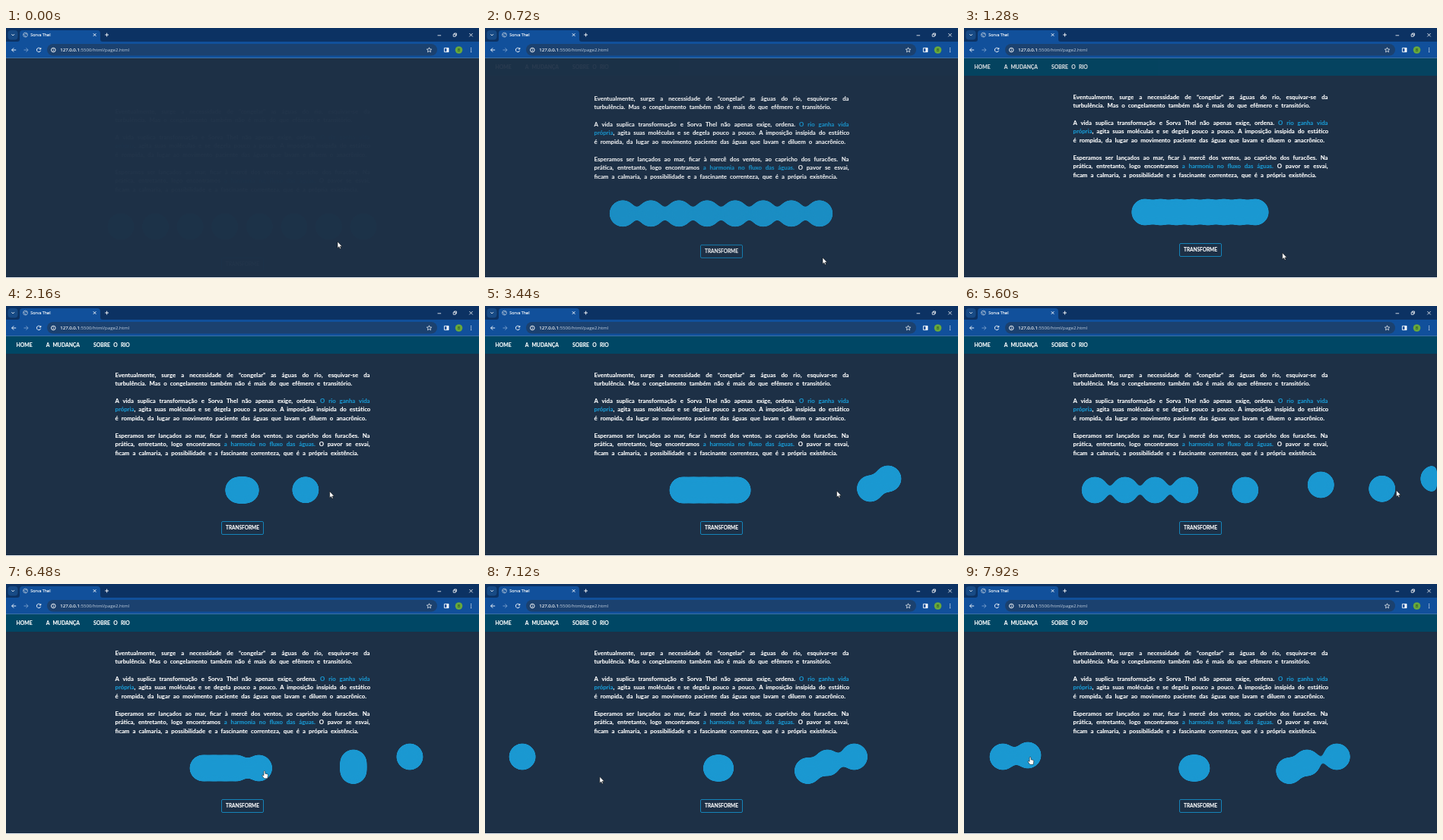
Write an HTML page that moves like this. It is 622 by 330 pixels and loops after 8 s.

```html
<!DOCTYPE html>
<html lang="pt">
<head>
<meta charset="utf-8">
<title>Sorva Thel</title>
<style>
  html, body { margin: 0; width: 100%; height: 100%; overflow: hidden; background: #1d3046; }
  #stage { position: absolute; left: 0; top: 0; width: 622px; height: 330px; overflow: hidden;
    background: #1d3046; color: #fff; font: bold 7.78px/11.46px Lato, sans-serif;
    -webkit-text-stroke: 0.12px currentColor; }
  svg { position: absolute; left: 0; top: 0; }
  #content { position: absolute; left: 0; top: 0; width: 622px; height: 330px; }
  #prose { position: absolute; left: 143.5px; top: 85.5px; width: 335px; word-spacing: 2.2px; }
  #prose p { margin: 0 0 11.46px; }
  #prose span { display: block; white-space: nowrap; text-align-last: justify; }
  #prose span:last-child { text-align-last: left; }
  em { font-style: normal; color: #1a98d1; }
  #button { position: absolute; left: 283px; top: 284px; width: 54px; height: 16px;
    border: 1px solid #1583b8; border-radius: 2px; text-align: center; font-size: 6.48px; line-height: 16.4px; }
  #nav { position: absolute; left: 0; top: 40px; width: 622px; height: 23px; background: #004765;
    font-size: 6.8px; line-height: 23.8px; word-spacing: 2.6px; white-space: nowrap; }
  #nav b { position: absolute; top: 0; }
  .ui { font-family: "Open Sans", "Noto Sans", sans-serif; font-weight: 400; -webkit-text-stroke: 0; }
</style>
</head>
<body>
<div id="stage">
  <div id="content">
    <div id="prose">
      <p><span>Eventualmente, surge a necessidade de “congelar” as águas do rio, esquivar-se da</span>
        <span>turbulência. Mas o congelamento também não é mais do que efêmero e transitório.</span></p>
      <p><span>A vida suplica transformação e Sorva Thel não apenas exige, ordena. <em>O rio ganha vida</em></span>
        <span><em>própria</em>, agita suas moléculas e se degela pouco a pouco. A imposição insípida do estático</span>
        <span>é rompida, da lugar ao movimento paciente das águas que lavam e diluem o anacrônico.</span></p>
      <p><span>Esperamos ser lançados ao mar, ficar à mercê dos ventos, ao capricho dos furacões. Na</span>
        <span>prática, entretanto, logo encontramos <em>a harmonia no fluxo das águas.</em> O pavor se esvai,</span>
        <span>ficam a calmaria, a possibilidade e a fascinante correnteza, que é a própria existência.</span></p>
    </div>
    <svg width="622" height="330">
      <filter id="goo" filterUnits="userSpaceOnUse" x="0" y="0" width="622" height="330" color-interpolation-filters="sRGB">
        <feGaussianBlur stdDeviation="4.7"/>
        <feColorMatrix values="1 0 0 0 0  0 1 0 0 0  0 0 1 0 0  0 0 0 20 -9.5"/>
      </filter>
      <clipPath id="view"><rect width="622" height="330"/></clipPath>
      <g filter="url(#goo)"><g id="drops" fill="#1a98d1" clip-path="url(#view)"></g></g>
    </svg>
    <div id="button">TRANSFORME</div>
  </div>

  <div id="nav">
    <b style="left:13.5px">HOME</b><b style="left:52.7px">A MUDANÇA</b><b style="left:115px">SOBRE O RIO</b>
  </div>

  <svg width="622" height="330" fill="none" stroke="#fff" stroke-width="0.9">
    <g stroke="none">
      <path fill="#0c3263" d="M0 0H622V19H0z"/>
      <path fill="#11509b" d="M0 18H622V40H0z"/>
      <path fill="#11509b" d="M15 18q3 0 3-3V7q0-4 4-4H120q4 0 4 4V15q0 3 3 3z"/>
      <path fill="#4a7ba8" d="M0 39.2H622V40H0z"/>
      <rect fill="#174a85" x="2.5" y="3" width="13" height="12.5" rx="4"/>
      <rect fill="#1b416f" x="54" y="21" width="513" height="15.6" rx="7.8"/>
      <path fill="#e9eef2" d="M0 329H622V330H0z"/>
      <circle fill="#68a83c" cx="595.5" cy="29" r="4.8"/>
    </g>
    <path d="M7.4 8.2l1.8 1.8 1.8-1.8"/>
    <g stroke="#c3d0de" stroke-width="0.7">
      <circle cx="25.5" cy="9" r="2.9"/>
      <path d="M22.8 8.3q2 .2 2.4 2t1.4 1.5M24.5 6.3q.4 1.8 3.6 1.8"/>
    </g>
    <path d="M114.8 7.2l3.6 3.6m0-3.6l-3.6 3.6M130.2 9h4.8m-2.4-2.4v4.8"/>
    <path stroke-width="0.8" d="M567.5 9.8h4.6M588.2 8.2h3v3h-3zM589.4 8.2V7h3v3h-1.2M609.3 7l4.4 4.4m0-4.4l-4.4 4.4"/>
    <path d="M13.2 29H7.6m2.6-2.6L7.6 29l2.6 2.6"/>
    <path stroke="#7ba0cc" d="M23.5 29h5.6m-2.6-2.6l2.6 2.6-2.6 2.6"/>
    <path d="M45.5 27.6a2.7 2.7 0 1 0 .2 2.2M45.8 26v2h-2"/>
    <circle cx="62.3" cy="29" r="2.8"/>
    <path d="M62.3 28.6v2M62.3 27v.8"/>
    <path stroke-width="0.7" d="M556.5 25.8l.9 2.1 2.3.2-1.7 1.5.5 2.2-2-1.2-2 1.2.5-2.2-1.7-1.5 2.3-.2z"/>
    <path d="M576.4 26.4h5.4v5.2h-5.4z"/>
    <path fill="#fff" stroke="none" d="M579.4 26h2.8v6h-2.8z"/>
    <path stroke-width="1.3" stroke-linecap="round" d="M611.6 26.6v.01M611.6 29v.01M611.6 31.4v.01"/>
    <g class="ui" fill="#fff" stroke="#fff" stroke-width="0.12">
      <text x="32.3" y="11" font-size="5.4">Sorva Thel</text>
      <text x="71.2" y="31.1" font-size="6.1">127.0.0.1<tspan fill="#c3d0df" stroke="none">:5500/html/page2.html</tspan></text>
      <text x="595.5" y="30.8" font-size="4.8" fill="#173a1c" stroke="none" text-anchor="middle">B</text>
    </g>
    <g id="cursor" fill="#fff" stroke="#000" stroke-width="0.5" stroke-linejoin="round">
      <path id="arrow" d="M0 0V8.4L1.9 6.7 3.2 9.5 4.5 8.9 3.3 6.2H5.9z"/>
      <path id="hand" d="M-.9 .8Q0-.5 .9 .8V3.8L3.9 4.5Q4.8 4.8 4.7 6L4 10.3H-.4L-3 6.6Q-3 5.4-1.8 5.8L-.9 6.6z"/>
    </g>
  </svg>
</div>
<script>
const LOOP = 8000, STEP = 80, START = -35;
const HALF = 2500, SPREAD = 45.6, MID = 310.5, ROW = 243, RADIUS = 18.1;
const DRAG = 400;
const $ = id => document.getElementById(id);
const clamp = v => Math.min(1, Math.max(0, v));
const mix = (a, b, p) => a + (b - a) * p;
const smooth = p => p * p * (3 - 2 * p);

// CSS-like timing curve, solved by bisection
const bezier = (x1, y1, x2, y2) => p => {
  const at = (a, b, u) => 3 * a * u * (1 - u) ** 2 + 3 * b * u * u * (1 - u) + u ** 3;
  let lo = 0, hi = 1;
  for (let i = 0; i < 22; i++) {
    const u = (lo + hi) / 2;
    if (at(x1, x2, u) < p) lo = u; else hi = u;
  }
  return at(y1, y2, lo);
};
const ease = bezier(.25, .1, .25, 1);
const easeInOut = bezier(.42, 0, .58, 1);

// the pointer pulls one drop after another away from its place in the row
const pull = (drop, start, dx, dy) => ({ drop, start, end: start + DRAG, dx, dy });
const pulls = [
  pull(6, 1960, 160, -2),
  pull(7, 2750, 169, -15),
  pull(4, 4280, 139, -7),
  pull(6, 5430, 109.6, 3.5),
  pull(5, 6500, -264, -15),
  pull(3, 7500, -225, -17)
];

const drops = Array.from({ length: 8 }, () => {
  const c = document.createElementNS("http://www.w3.org/2000/svg", "circle");
  c.setAttribute("r", RADIUS);
  return $("drops").appendChild(c);
});

function gapAt(t) {
  const phase = ((t - START) / HALF) % 2;
  return SPREAD * easeInOut(Math.abs(1 - phase));
}

function dropAt(i, t) {
  let dx = 0, dy = 0;
  for (const q of pulls.filter(q => q.drop === i)) {
    const p = smooth(clamp((t - q.start) / DRAG));
    dx = mix(dx, q.dx, p);
    dy = mix(dy, q.dy, p ** 3);
  }
  return [MID + (i - 3.5) * gapAt(t) + dx, ROW + dy];
}

function gripAt(q, t) {
  const [x, y] = dropAt(q.drop, t);
  const lead = 0.18 * q.dx * Math.sin(Math.PI * clamp((t - q.start) / DRAG)) ** 8;
  return [x + lead + 3, y + 2];
}

// glide between two places on a slightly sagging path
function glide([ax, ay], [bx, by], p) {
  const sag = 0.08 * Math.abs(bx - ax) * Math.sin(Math.PI * p);
  return [mix(ax, bx, p), mix(ay, by, p) + sag];
}

function pointerAt(t) {
  const next = pulls.find(q => q.start > t);
  const last = pulls.filter(q => q.start <= t).pop();
  if (last && (t <= last.end || !next)) return gripAt(last, Math.min(t, last.end));
  const idle = smooth(clamp(t / 720));
  const from = last ? gripAt(last, last.end) : [436 + 8 * idle, 282 + 21 * idle];
  const leave = last ? last.end : 1100;
  return glide(from, gripAt(next, next.start), clamp((t - leave) / (next.start - leave)));
}

function draw(t) {
  const shown = ease(clamp((t - START) / 1200));
  $("content").style.opacity = shown;
  $("content").style.transform = `translateY(${19.4 * (1 - shown)}px)`;
  $("nav").style.opacity = ease(clamp((t - 645) / 1200));

  const [px, py] = pointerAt(t);
  let over = false;
  drops.forEach((c, i) => {
    const [x, y] = dropAt(i, t);
    c.setAttribute("cx", x);
    c.setAttribute("cy", y);
    if (Math.hypot(x - px, y - py) < RADIUS) over = true;
  });
  $("cursor").setAttribute("transform", `translate(${px} ${py})`);
  $("hand").style.display = over ? "" : "none";
  $("arrow").style.display = over ? "none" : "";
}

function tick() {
  const t = performance.now() % LOOP;
  draw(Math.floor(t / STEP) * STEP);
  requestAnimationFrame(tick);
}
tick();
</script>
</body>
</html>
```
